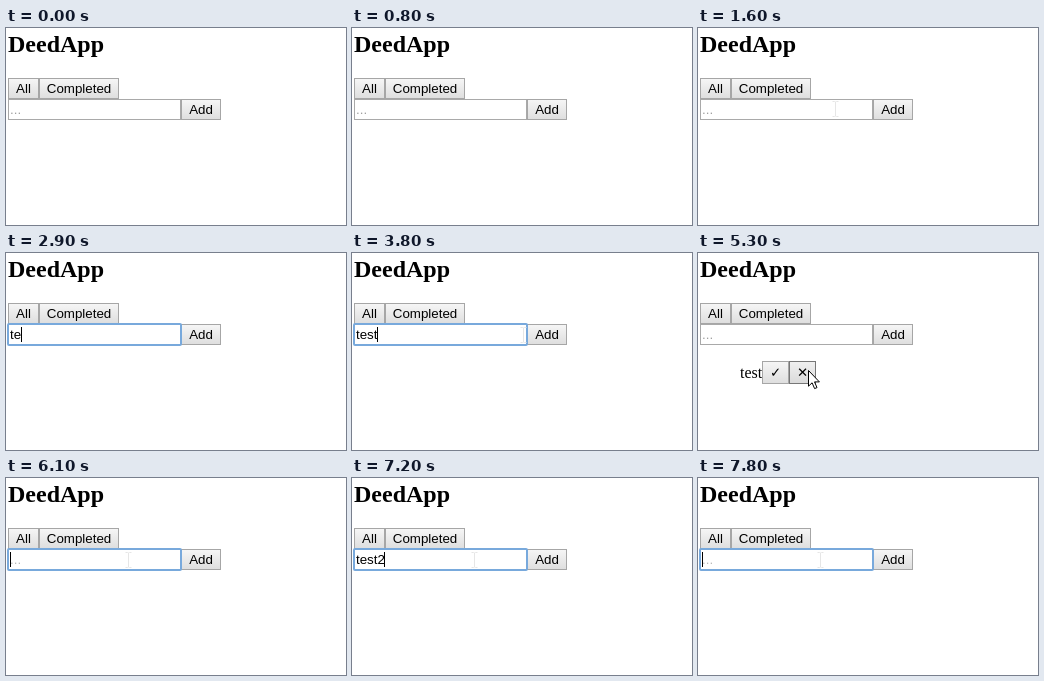
An HTML page for the animation above (8 s loop, 340x197 px).

```html
<!DOCTYPE html>
<html lang="en">
<head>
<meta charset="utf-8">
<title>DeedApp</title>
<style>
  html, body { margin: 0; width: 100%; height: 100%; overflow: hidden; background: #fff; }
  svg { display: block; }
  text { font: 13.333px "Liberation Sans", Arial, sans-serif; white-space: pre; }
  .title { font: bold 24px "Liberation Serif", Times, serif; }
  .label { font: 16px "Liberation Serif", Times, serif; }
  .button text { text-anchor: middle; }
  .icon text { font: bold 13.333px "DejaVu Sans", sans-serif; }
  .button rect { fill: url(#face); stroke: #a6a6a6; }
  .hover rect { fill: url(#faceHover); stroke: #777; }
</style>
</head>
<body>
<svg width="340" height="197" viewBox="0 0 340 197">
  <defs>
    <linearGradient id="face" x2="0" y2="1">
      <stop stop-color="#f6f6f6"/><stop offset="1" stop-color="#dedede"/>
    </linearGradient>
    <linearGradient id="faceHover" x2="0" y2="1">
      <stop stop-color="#f0f0f0"/><stop offset="1" stop-color="#dadada"/>
    </linearGradient>
  </defs>
  <text class="title" x="2" y="24">DeedApp</text>
  <g id="toolbar"></g>
  <g id="item"><text class="label" x="42" y="125">test</text></g>
  <rect id="field" fill="#fff"/>
  <text id="hint" x="4" y="86">...</text>
  <text id="value" x="4" y="86"></text>
  <path id="caret" d="M.5 74V89" stroke="#000"/>
  <path id="beam" d="M-3 -7.5H-1L0 -7L1 -7.5H3M0 -7V7M-3 7.5H-1L0 7L1 7.5H3" fill="none" stroke="#e6e6e6"/>
  <path id="arrow" d="M.5 .5V16.2L4.1 12.8L6.6 18.6L9 17.6L6.5 11.9H11.4Z" fill="#fff" stroke="#000"/>
</svg>
<script>
const $ = id => document.getElementById(id);
const LOOP = 8000, STEP = 100;

// [time, x, y] of the pointer
const pointerPath = [
  [0, 150, 82], [100, 150, 67], [700, 188, 9], [800, 200, -30],
  [1000, 340, -30], [1100, 320, 15], [1500, 150, 71], [1600, 137, 81],
  [2200, 137, 81], [2400, 136, 84], [3600, 136, 84], [3800, 171, 82],
  [3900, 183, 80], [4000, 190, 78], [4300, 190, 78], [4400, 188, 98],
  [5200, 110, 117], [5500, 110, 117], [6000, 122, 82], [LOOP, 122, 82]
];

// [time, field text]
const typing = [
  [0, ""], [2600, "t"], [2800, "te"], [3100, "tes"], [3300, "test"], [4200, ""],
  [6600, "te"], [6700, "tes"], [6800, "test"], [7200, "test2"],
  [7500, "test"], [7600, "tes"], [7700, "te"], [7800, ""]
];

const between = (t, from, to) => t >= from && t < to;
const show = (el, on) => el.setAttribute("visibility", on ? "visible" : "hidden");
const setAttrs = (el, attrs) => {
  for (const name in attrs) el.setAttribute(name, attrs[name]);
  return el;
};
const svgNode = (name, attrs, parent) =>
  parent.appendChild(setAttrs(document.createElementNS("http://www.w3.org/2000/svg", name), attrs));

function addButton(parent, label, x, y, w, h, kind = "") {
  const el = svgNode("g", { class: "button " + kind }, parent);
  svgNode("rect", { x: x + .5, y: y + .5, width: w - 1, height: h - 1 }, el);
  svgNode("text", { x: x + w / 2, y: y + h / 2 + 4.5 }, el).textContent = label;
  return { el, x, y, w, h };
}

const toolbar = $("toolbar"), item = $("item");
const buttons = [
  addButton(toolbar, "All", 2, 50, 31, 21),
  addButton(toolbar, "Completed", 33, 50, 80, 21),
  addButton(toolbar, "Add", 175, 71, 40, 21),
  addButton(item, "✓", 64, 108, 27, 23, "icon"),
  addButton(item, "✕", 91, 108, 27, 23, "icon")
];
const inputBox = { x: 2, y: 71.5, w: 173, h: 21 };
const contains = (box, x, y) =>
  between(x, box.x, box.x + box.w) && between(y, box.y, box.y + box.h);

function pointerAt(t) {
  const i = pointerPath.findIndex(p => p[0] > t);
  const [t0, x0, y0] = pointerPath[i - 1], [t1, x1, y1] = pointerPath[i];
  const k = (t - t0) / (t1 - t0);
  return [Math.round(x0 + (x1 - x0) * k), Math.round(y0 + (y1 - y0) * k)];
}

function render(t) {
  const [x, y] = pointerAt(t);
  const text = typing.filter(entry => entry[0] <= t).pop()[1];
  const focused = between(t, 2100, 4100) || t >= 6100;
  const inInput = contains(inputBox, x, y);

  $("value").textContent = text;
  show($("hint"), !text);
  $("hint").setAttribute("fill", focused ? "#bbb" : "#a0a0a0");
  setAttrs($("field"), focused
    ? { x: 2, y: 71, width: 173, height: 21, rx: 1, stroke: "#78a9dc", "stroke-width": 2 }
    : { x: 2.5, y: 71.5, width: 172, height: 20, rx: 0, stroke: "#a9a9a9", "stroke-width": 1 });

  const caretX = 4 + (text ? Math.floor($("value").getComputedTextLength()) : 0);
  $("caret").setAttribute("transform", `translate(${caretX})`);
  show($("caret"), focused);

  const itemShown = between(t, 4500, 5500);
  item.style.display = itemShown ? "" : "none";
  for (const b of buttons) b.el.classList.toggle("hover", contains(b, x, y));

  show($("arrow"), !inInput);
  show($("beam"), inInput && t >= 100 && !between(t, 2600, 3600));
  $("arrow").setAttribute("transform", `translate(${x} ${y})`);
  $("beam").setAttribute("transform", `translate(${x + .5} ${y})`);
}

const start = performance.now();
function tick() {
  const t = (performance.now() - start) % LOOP;
  render(Math.floor(t / STEP) * STEP);
  requestAnimationFrame(tick);
}
tick();
</script>
</body>
</html>
```
